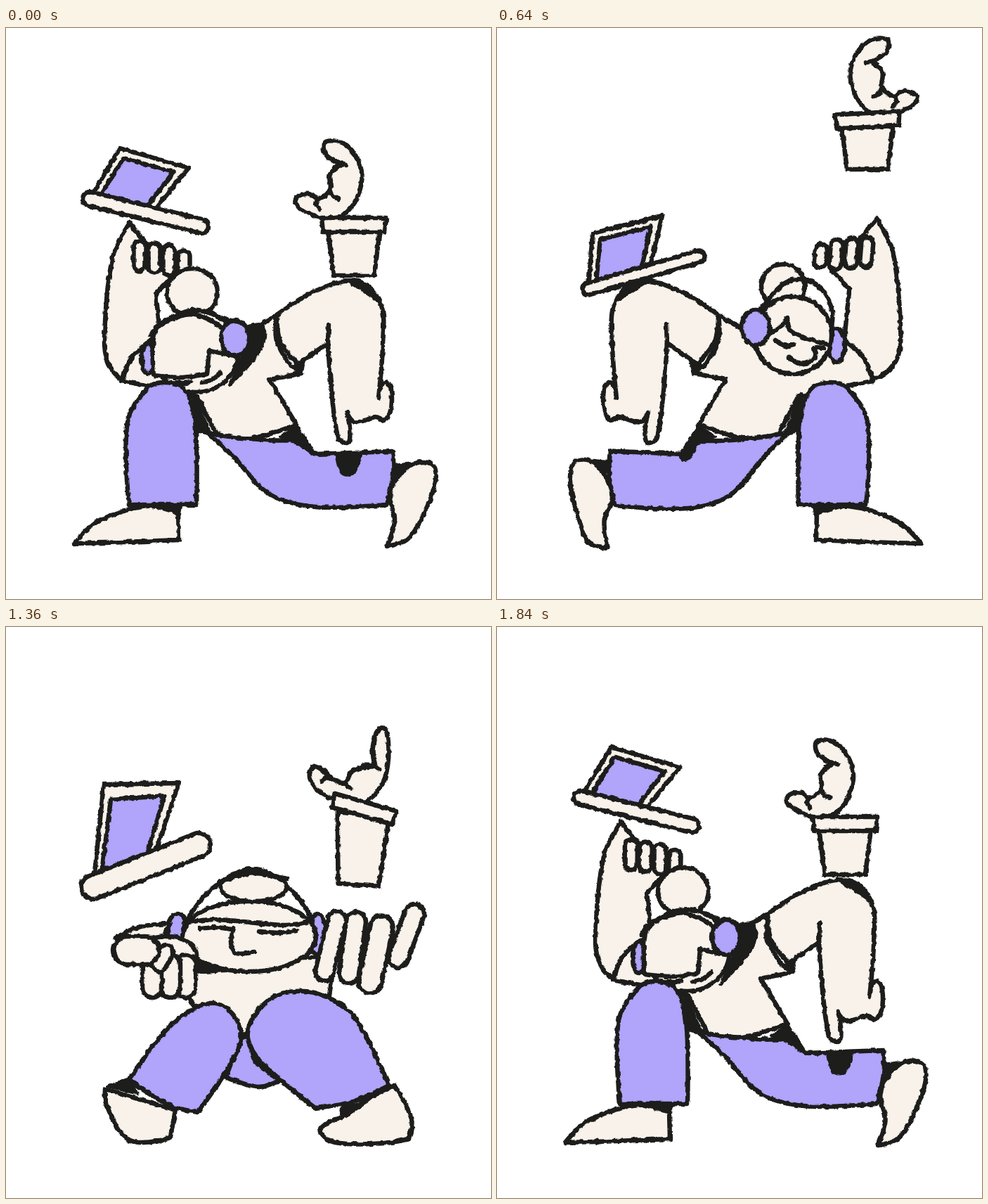
Recreate the animation shown at these times as an HTML page with a canvas. Size 690 by 812 pixels, loop 1.92 s.

```html
<!DOCTYPE html>
<html lang="en">
<head>
<meta charset="utf-8">
<title>Juggling lunge</title>
<style>
html, body { margin: 0; width: 100%; height: 100%; overflow: hidden; background: #fff; }
canvas { display: block; width: 100%; height: 100%; filter: url(#rough); }
svg { position: absolute; }
</style>
</head>
<body>
<canvas id="stage" width="690" height="812"></canvas>
<svg width="0" height="0">
  <filter id="rough" x="0" y="0" width="1" height="1" color-interpolation-filters="sRGB">
    <feTurbulence id="noise" type="fractalNoise" baseFrequency=".13" numOctaves="2"/>
    <feDisplacementMap in="SourceGraphic" scale="5" xChannelSelector="R" yChannelSelector="G"/>
  </filter>
</svg>
<script>
const ctx = document.getElementById('stage').getContext('2d');
const noise = document.getElementById('noise');
const INK = '#1d1d1c', CREAM = '#f8f2ea', PURPLE = '#b0a4fb';
const lerp = (a, b, t) => a + (b - a) * t;
let blend = 0; // how far outlines move from their first form to their second

// "x y" pairs; a star marks a sharp corner.
const read = text => [...text.matchAll(/(\d+) (\d+)(\*?)/g)].map(m => ({ x: +m[1], y: +m[2], sharp: m[3] }));

function trace(a, b, closed) {
  const to = read(b);
  const pts = read(a).map((p, i) => ({ ...p, x: lerp(p.x, to[i].x, blend), y: lerp(p.y, to[i].y, blend) }));
  const n = pts.length;
  const at = i => closed ? pts[(i + n) % n] : pts[Math.max(0, Math.min(n - 1, i))];
  const handle = (i, reach) => {
    const p = at(i), u = at(i - 1), v = at(i + 1);
    const k = p.sharp ? 0 : reach / (Math.hypot(v.x - u.x, v.y - u.y) || 1);
    return [p.x + (v.x - u.x) * k, p.y + (v.y - u.y) * k];
  };
  ctx.beginPath();
  ctx.moveTo(pts[0].x, pts[0].y);
  for (let i = 0; i < (closed ? n : n - 1); i++) {
    const p = at(i), q = at(i + 1), reach = Math.hypot(q.x - p.x, q.y - p.y) / 3;
    ctx.bezierCurveTo(...handle(i, reach), ...handle(i + 1, -reach), q.x, q.y);
  }
  if (closed) ctx.closePath();
}

function finish(fill) {
  ctx.lineWidth = fill === INK ? 4 : 6.5;
  ctx.strokeStyle = INK;
  if (fill) { ctx.fillStyle = fill; ctx.fill(); }
  ctx.stroke();
}

const pen = fill => (a, b = a) => { trace(a, b, !!fill); finish(fill); };
const cream = pen(CREAM), purple = pen(PURPLE), black = pen(INK), line = pen(null);

function disc(fill, x, y, rx, ry, turn = 0) {
  ctx.beginPath();
  ctx.ellipse(x, y, rx, ry, turn, 0, 7);
  finish(fill);
}

function bar(x1, y1, x2, y2, w) {
  for (const [color, grow] of [[INK, 6.5], [CREAM, -6.5]]) {
    ctx.beginPath();
    ctx.moveTo(x1, y1);
    ctx.lineTo(x2, y2);
    ctx.strokeStyle = color;
    ctx.lineWidth = w + grow;
    ctx.stroke();
  }
}

function poly(fill, ...pts) {
  ctx.beginPath();
  pts.forEach(p => ctx.lineTo(...p));
  ctx.closePath();
  finish(fill);
}

function place(x, y, draw, sx = 1, turn = 0) {
  ctx.save();
  ctx.translate(x, y);
  ctx.rotate(turn * Math.PI / 180);
  ctx.scale(sx, 1);
  draw();
  ctx.restore();
}

function rearLeg() {
  purple('285 575* 370 586 410 586* 440 606* 550 602* 551 635 541 678* 440 681 375 663 322 608',
    '288 577* 370 587 405 588* 427 606* 521 601* 523 640 518 681* 410 686 360 668 308 603');
  cream('552 645* 575 622 605 620 611 645 590 700 570 728 542 737* 553 700 546 668',
    '528 640* 538 613 562 611 571 650 571 700 568 738 543 742* 538 700 520 670');
  black('552 622* 578 619* 557 640*', '526 609* 544 607* 530 632*');
}

function knee(bent) {
  if (bent) return black('413 584* 440 606* 435 614 424 608');
  black('470 608* 505 607* 494 633 478 633', '482 608* 507 605* 504 626 488 625');
}

function raisedArm() {
  cream('176 277* 152 325 140 440 146 478 168 501 220 510* 220 440* 213 378* 240 350* 190 295',
    '189 277* 160 320 142 430 146 475 166 502 220 510* 225 440* 214 380* 255 350* 202 300');
  for (let i = 3; i >= 0; i--) {
    const x = lerp(190 + 21 * i, 199 + 17 * i, blend), y = lerp(324 + 3 * i, 321 + 9 * i, blend);
    const lean = 5 * blend, half = i > 2 ? 8 : 13;
    bar(x + lean, y - half, x - lean, y + half, 17);
  }
}

function bentArm() {
  cream('385 408* 440 374 500 360 533 392 536 450 530 526* 540 504 549 530 540 557 526 553 510 558 495 560 485 547* 488 588 472 582 458 448* 415 478* 390 445');
  line('459 421* 458 452*');
  black('482 358* 514 366 532 390* 508 374');
  black('407 481* 425 473* 420 492*');
}

function torso() {
  black('390 581* 414 567* 436 600*');
  cream('165 502* 180 467 215 438* 355 426* 385 408* 385 445 405 480* 420 491* 375 500* 413 564* 350 583 300 578* 272 525* 220 512*');
  black('266 520* 292 578* 268 572*');
}

function frontLeg() {
  black('205 678* 249 680* 247 692*');
  cream('97 733* 130 702 200 680 245 690* 246 728* 170 731');
  purple('175 678* 173 560 203 511 227 504 253 513 269 560 271 678*');
}

function headDownLeft() {
  disc(CREAM, 265, 376, 36, 34);
  black('345 424* 366 424 362 458 318 508* 335 470');
  disc(CREAM, 270, 460, 61, 58);
  line('234 413 272 401 314 415');
  disc(PURPLE, 202, 470, 9, 22);
  line('206 437 215 424 235 412');
  cream('210 494* 212 432 235 414 270 408 312 432 318 465* 289 458* 286 492* 250 497');
  line('243 504 253 505 263 503');
  line('278 504 292 501 305 491');
  disc(PURPLE, 326, 441, 20, 25);
}

function headDownRight() {
  disc(CREAM, 444, 365, 35, 34);
  disc(PURPLE, 504, 455, 9, 24);
  black('480 393* 503 415 516 442 510 468 503 430');
  cream('378 468* 390 486 410 500* 412 462*');
  cream('385 425 405 396 445 387 485 402 500 430 500 465 486 500 450 515 410 508* 415 493 414 468* 386 465*');
  line('388 434 420 426 460 428 498 441');
  line('397 478 400 487 407 491');
  disc(PURPLE, 372, 435, 19, 27);
}

function headUp(bunX, bunY, shadow) {
  disc(CREAM, bunX, bunY, 31, 31);
  line('234 440 232 410 245 380 270 364 300 369 334 405');
  disc(PURPLE, 226, 457, 12, 24);
  if (shadow) black('365 415* 378 422 360 460 315 496* 340 455');
  disc(CREAM, 288, 443, 55, 55);
  line('238 456* 290 438 296 418* 306 431 320 440');
  line('287 456 299 458 313 450');
  line('245 461 257 461 256 472 265 481 280 483 293 475');
  disc(PURPLE, 341, 432, 20, 25);
}

const laptops = {
  low: [119, 243, 278, 282, 162, 171, 260, 199, 20],
  high: [120, 232, 272, 298, 181, 168, 268, 209, 18],
  rest: [129, 372, 285, 326, 120, 285, 213, 261, 17],
  lean: [130, 371, 287, 325, 136, 292, 235, 267, 17],
  front: [120, 362, 270, 302, 135, 216, 242, 214, 34]
};

// The lid hangs on the base bar; the display is an inset of the lid.
function laptop(from, to, t) {
  const [x1, y1, x2, y2, lx, ly, rx, ry, w] = laptops[from].map((v, i) => lerp(v, laptops[to][i], t));
  const hx = lerp(x1, x2, .55), hy = lerp(y1, y2, .55);
  const lid = (u, v) => [lerp(lerp(lx, rx, u), lerp(x1, hx, u), v), lerp(lerp(ly, ry, u), lerp(y1, hy, u), v)];
  poly(CREAM, lid(0, 0), lid(1, 0), lid(1, 1), lid(0, 1));
  poly(PURPLE, lid(.12, .15), lid(.86, .15), lid(.86, 1), lid(.12, 1));
  bar(x1, y1, x2, y2, w);
}

function plant() {
  cream('450 271* 428 262 412 250 416 239 432 236 444 243 461 230 461 208 478 194* 455 180 455 162 485 168 506 205 498 245 478 268*',
    '468 266* 438 254 421 236 426 221 440 223 452 233 470 232 478 213 504 204* 493 182 501 158 518 172 524 215 512 247 492 266*');
  line('444 243 441 250 446 258', '452 233 447 235 444 241');
  line('461 230 465 239 473 243', '470 232 474 239 480 242');
  line('468 198 478 194 484 195', '490 204 501 203 509 207');
}

function cup(x, y, turn, height, lean, band) {
  place(x, y, () => poly(CREAM, [-37, 6], [-29, height], [29, height], [37, 6]), 1, lean);
  place(x, y, () => {
    const w = band ? 40 : 46;
    poly(CREAM, [-w, -10], [w, -10], [w - 2, 10], [2 - w, 10]);
    if (band) poly(INK, [-w, -1], [w, -1], [w, 12], [-w, 12]);
  }, 1, turn);
}

function lungeLeft(t, lidT = t, dx = 0, dy = 0) {
  blend = t;
  rearLeg();
  knee();
  raisedArm();
  bentArm();
  torso();
  t < .5 ? headDownLeft() : headUp(325, 368, true);
  frontLeg();
  place(dx, dy, () => laptop('low', 'high', lidT));
  blend = lidT < t ? 1.2 : t;
  plant();
  cup(495, 280, 0, 72, 0);
}

function lungeRight(t, lift = 0) {
  const flip = draw => place(700, 0, draw, -1);
  flip(() => {
    blend = .38 * t;
    rearLeg();
    knee(true);
    blend = lerp(.9, -.2, t);
    place(-14 * t, -6 * t, raisedArm);
    bentArm();
    torso();
  });
  if (t < .5) headDownRight();
  else flip(() => place(-9, -6, () => headUp(302, 373, false)));
  flip(frontLeg);
  laptop('rest', 'lean', t);
  place(0, lift, () => {
    blend = 0;
    place(lerp(1000, 1009, t), lerp(-84, -80, t), plant, -1);
    t < .5 ? cup(526, 183, -2, 84, 0, true) : cup(527, 197, -3, 70, 0);
  });
}

function squatBody() {
  disc(PURPLE, 275, 437, 12, 29);
  disc(PURPLE, 474, 430, 14, 22);
  cream('250 470* 259 530* 380 580* 452 538* 460 520* 450 470*');
  black('405 489* 450 475* 449 492*');
  cream('485 422* 530 427 562 442* 500 455*');
  purple('370 580* 328 645* 360 654 405 640* 385 585*');
  black('325 646* 350 615 372 588* 363 620');
  line('280 430 290 402 315 372 366 344 425 372 464 420');
  disc(CREAM, 366, 370, 47, 20);
  line('318 358 366 350 412 362');
  disc(CREAM, 372, 440, 95, 50);
  line('283 418* 320 424 420 416 464 421*');
  line('305 432 330 435 357 433');
  line('398 430 420 427 442 429');
  line('394 428* 398 450 390 464 365 462');
  bar(137, 408, 160, 470, 28);
  bar(247, 417, 265, 490, 26);
  bar(220, 419, 230, 493, 28);
  bar(184, 427, 200, 504, 33);
  disc(CREAM, 489, 467, 42, 27);
  for (const x of [462, 484, 510]) bar(x, 480, x, 513, 28);
  bar(490, 462, 500, 480, 20);
  bar(520, 460, 545, 460, 40);
  cream('477 687* 484 725* 500 731 545 728 575 680 577 657*');
  black('542 642* 574 653* 530 664*');
  cream('165 652* 141 700 145 728* 180 734 250 733 271 718 262 706 235 695* 205 672');
  black('205 676* 240 683* 242 700*');
  purple('173 652* 222 555 262 526 305 518 345 531 374 575 358 615 278 684* 225 675');
  purple('445 690* 395 615 384 575 410 538 445 540 490 573 542 642* 520 660 480 682');
}

function squat(turned, lx, ly, cx, cy) {
  blend = 0;
  turned ? place(718, 0, squatBody, -1) : squatBody();
  place(lx, ly, () => laptop('front', 'front', 0));
  place(cx, cy, () => {
    blend = 1.6;
    place(0, 18, plant);
    cup(503, 289, 16, 108, 4);
  });
}

const L = (...a) => () => lungeLeft(...a);
const R = (...a) => () => lungeRight(...a);
const S = (...a) => () => squat(...a);
const steps = [
  L(0), L(.08), L(.5), L(.92), L(1), L(1), S(false, 0, 0, 0, 0), S(true, 4, 14, 6, -14),
  R(1, -66), R(1, -42), R(.4, -12), R(0), R(0), R(.08), R(.6), R(1), R(1),
  S(true, 4, 8, 6, -30), S(false, 0, -25, 0, -8),
  L(1, 0, 13, -46), L(1, 0, 7, -14), L(.8), L(.2), L(.03)
];

ctx.lineJoin = ctx.lineCap = 'round';
const start = performance.now();
let shown = -1;
function tick() {
  const i = Math.floor((performance.now() - start) % 1920 / 80);
  if (i !== shown) {
    shown = i;
    noise.setAttribute('seed', i + 1);
    ctx.clearRect(0, 0, 690, 812);
    steps[i]();
  }
  requestAnimationFrame(tick);
}
tick();
</script>
</body>
</html>
```
